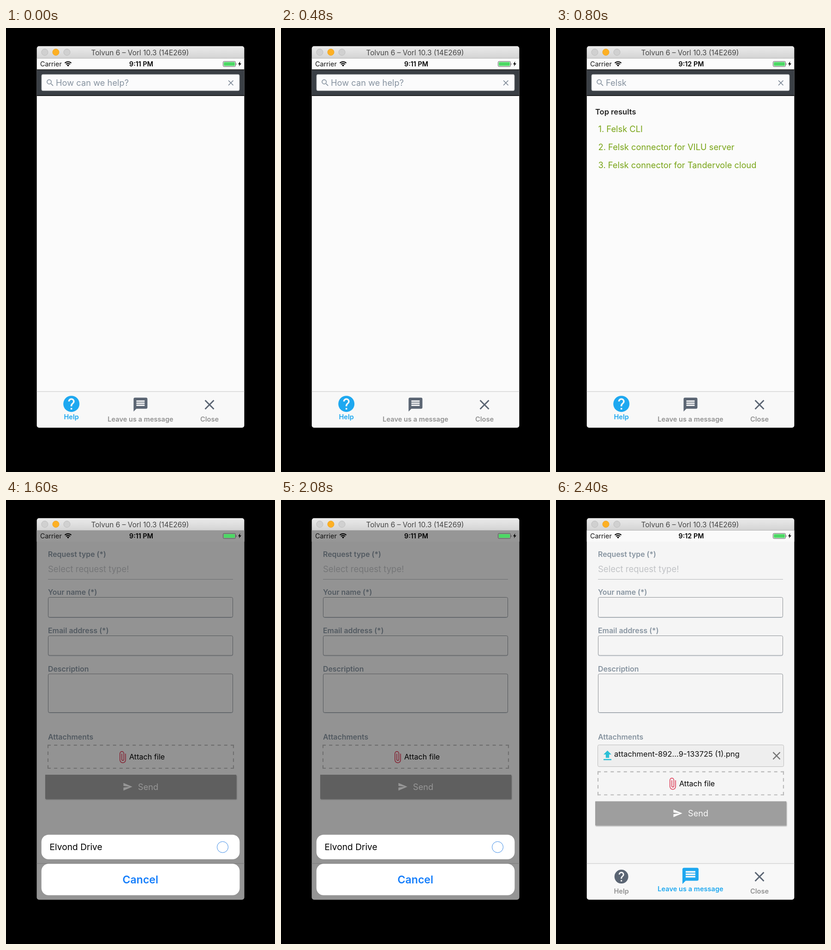
Recreate the animation shown at these times as an HTML page. Size 583 by 960 pixels, loop 3.2 s.

```html
<!DOCTYPE html>
<html lang="en">
<head>
<meta charset="utf-8">
<title>Help screens</title>
<style>
  html, body { margin: 0; width: 100%; height: 100%; overflow: hidden; background: #000; }
  svg { display: block; width: 583px; height: 960px; font-family: Inter, sans-serif; }
</style>
</head>
<body>
<svg id="stage" viewBox="0 0 583 960"></svg>
<script>
const STEP = 800;
const BLUE = '#1ea8f0', SLATE = '#5b6573', LABEL = '#8794a0';

const ICONS = {
  help: 'M12 2a10 10 0 1 0 0 20 10 10 0 0 0 0-20zm1 17h-2v-2h2zm2.07-7.75l-.9.92C13.45 12.9 13 13.5 13 15h-2v-.5c0-1.1.45-2.1 1.17-2.83l1.24-1.26c.37-.36.59-.86.59-1.41a2 2 0 0 0-4 0H8a4 4 0 0 1 8 0c0 .88-.36 1.68-.93 2.25z',
  message: 'M20 2H4a2 2 0 0 0-2 2v18l4-4h14a2 2 0 0 0 2-2V4a2 2 0 0 0-2-2zm-2 12H6v-2h12zm0-3H6V9h12zm0-3H6V6h12z',
  close: 'M19 6.4L17.6 5 12 10.6 6.4 5 5 6.4l5.6 5.6L5 17.6 6.4 19l5.6-5.6 5.6 5.6 1.4-1.4-5.6-5.6z',
  search: 'M15.5 14h-.8l-.3-.3a6.5 6.5 0 1 0-.7.7l.3.3v.8l5 5 1.5-1.5zm-6 0a4.5 4.5 0 1 1 0-9 4.5 4.5 0 0 1 0 9z',
  send: 'M2 21l21-9L2 3v7l15 2-15 2z',
  upload: 'M9 16h6v-6h4l-7-7-7 7h4zm-4 2h14v2H5z'
};

const text = (x, y, str, size, fill, weight = 400, anchor = 'start') =>
  `<text x="${x}" y="${y}" font-size="${size}" fill="${fill}" font-weight="${weight}" text-anchor="${anchor}">${str}</text>`;
const rect = (x, y, w, h, fill, more = '') =>
  `<rect x="${x}" y="${y}" width="${w}" height="${h}" fill="${fill}" ${more}/>`;
// Full-width strip; the window clip trims its ends.
const band = (y, h, fill, more) => rect(66, y, 452, h, fill, more);
const circle = (x, y, r, fill, stroke) =>
  `<circle cx="${x}" cy="${y}" r="${r}" fill="${fill}" stroke="${stroke}"/>`;
// Icons sit on a 24-unit grid centred on (x, y).
const icon = (name, x, y, scale, fill) =>
  `<path d="${ICONS[name]}" fill="${fill}" transform="translate(${x} ${y}) scale(${scale}) translate(-12 -12)"/>`;
// A straight run of equal dashes and gaps with a dash at both ends.
const dashes = (d, count) => `<path d="${d}" pathLength="${2 * count - 1}" stroke-dasharray="1"/>`;

function titleBar() {
  return band(39, 27, 'url(#chrome)') + band(65, 1, '#b4b4b4') +
    circle(84, 52.3, 7, '#d0d0d0', '#bcbcbc') +
    circle(108, 52.3, 7, '#fdb024', '#eda420') +
    circle(132, 52.3, 7, '#d0d0d0', '#bcbcbc') +
    text(290.5, 58.5, 'Tolvun 6 – Vorl 10.3 (14E269)', 15.5, '#454545', 400, 'middle');
}

function statusBar(time) {
  return text(74, 83, 'Carrier', 14.3, '#111') +
    '<g fill="none" stroke="#000" stroke-width="2"><path d="M127.5 75.8a10 10 0 0 1 14 0M130 78.6a6.4 6.4 0 0 1 9 0"/></g>' +
    '<path d="M134.5 83.2l-2.5-2.7a3.6 3.6 0 0 1 5 0z"/>' +
    text(293, 83, time, 14.4, '#000', 600, 'middle') +
    rect(470.5, 72.3, 27, 11, 'none', 'rx="2" stroke="#555"') +
    rect(472, 73.8, 24, 8, '#4cd964', 'rx="1"') +
    '<path d="M498.7 76v4q1.6-2 0-4zM507.5 72l-4.5 6.4h3l-1.2 4.6 5.2-6.6h-3.2z"/>';
}

function tab(name, label, x, active) {
  const y = name === 'close' ? 814.5 : active ? 812.7 : 814.3;
  return icon(name, x, y, active ? 1.75 : 1.5, active ? BLUE : SLATE) +
    text(x, active ? 846.3 : 851, label, 14.6, active ? BLUE : '#919191', 600, 'middle');
}

function tabBar(active) {
  return band(786, 79, '#f8f8f8') + band(785.5, 1, '#c6c6c6') +
    tab('help', 'Help', 141.7, active === 'help') +
    tab('message', 'Leave us a message', 291.5, active === 'message') +
    tab('close', 'Close', 441, false);
}

function searchPage(query, results = []) {
  const heading = results.length ? text(85, 187, 'Top results', 16.5, '#222', 600) : '';
  return band(66, 720, '#fbfbfb') +
    band(90, 57, '#3a3f45') + band(89.5, 1.5, '#111') + band(145.5, 1.5, '#111') +
    rect(77, 100.3, 429, 35.4, '#fbfbfc', 'rx="3" stroke="#a4a8ac"') +
    icon('search', 95.7, 118.5, .83, '#8793a0') +
    text(108, 125, query, 18.3, '#8793a0') +
    icon('close', 487.3, 118.7, .82, '#7d8896') + heading +
    results.map((name, i) => text(91.5, 225 + 39 * i, `${i + 1}. ${name}`, 18.3, '#78a416')).join('') +
    tabBar('help');
}

function field(label, y, height) {
  return text(91, y - 5, label, 15.9, LABEL, 600) +
    rect(91.5, y + 1.5, 400, height, 'none', 'rx="3" stroke="#c8d0d8"') +
    rect(91.5, y + .5, 400, height, '#f5f5f5', 'rx="3" stroke="#8e9297"');
}

function attachment() {
  return rect(90.5, 529.5, 403, 47, '#eee', 'rx="3" stroke="#bdbdbd"') +
    icon('upload', 111.5, 552.7, 1.22, '#2bc0d6') +
    text(126, 555, 'attachment-892...9-133725 (1).png', 16.5, '#111') +
    icon('close', 478, 553, 1.2, '#757575');
}

function formPage(attached) {
  const actions =
    '<g fill="none" stroke="#b9b9b9" stroke-width="2.2">' +
    dashes('M90 530.2H494', 29) + dashes('M90 580H494', 29) +
    dashes('M91 529V581', 4) + dashes('M493 529V581', 4) + '</g>' +
    '<path d="M259.2 549v13a6.1 6.1 0 0 1-12.2 0V548a4.2 4.2 0 0 1 8.4 0v13a2.2 2.2 0 0 1-4.4 0V549" fill="none" stroke="#df4760" stroke-width="1.7" stroke-linecap="round"/>' +
    text(267, 561, 'Attach file', 16.2, '#000') +
    rect(85, 594, 414, 52, '#9e9e9e', 'filter="url(#shadow)"') +
    icon('send', 263.7, 620, .92, '#fafafa') +
    text(286, 626.5, 'Send', 18.2, '#fafafa');
  return band(66, 720, '#f5f5f5') + band(66, 24, '#fafafa') +
    text(91, 122.5, 'Request type (*)', 15.9, LABEL, 600) +
    text(91, 156, 'Select request type!', 18.5, '#c1c3c6') +
    rect(91, 171, 401, 1, '#b5b7ba') +
    field('Your name (*)', 210, 43) + field('Email address (*)', 293, 42.5) + field('Description', 375.5, 83.5) +
    text(91, 517.5, 'Attachments', 15.9, LABEL, 600) +
    (attached ? attachment() : '') +
    `<g transform="translate(0 ${attached ? 57.5 : 0})">${actions}</g>` +
    tabBar('message');
}

function actionSheet() {
  return band(66, 799, '#000', 'opacity=".4"') +
    rect(76.8, 723.8, 429.6, 53, '#fff', 'rx="15.5"') +
    rect(76.8, 786.6, 429.6, 68, '#fff', 'rx="15.5"') +
    text(94.5, 757, 'Elvond Drive', 19.2, '#000') +
    circle(469.5, 750.5, 12, 'none', '#3b8ae6') +
    text(291.3, 829, 'Cancel', 23.1, '#157efb', 600, 'middle');
}

const scenes = [
  searchPage('How can we help?') + statusBar('9:11 PM'),
  searchPage('Felsk', ['Felsk CLI', 'Felsk connector for VILU server', 'Felsk connector for Tandervole cloud']) + statusBar('9:12 PM'),
  formPage(false) + actionSheet() + statusBar('9:11 PM'),
  formPage(true) + statusBar('9:12 PM')
];

const stage = document.getElementById('stage');
stage.innerHTML = `<defs>
  <linearGradient id="chrome" x2="0" y2="1"><stop stop-color="#ebebeb"/><stop offset="1" stop-color="#d3d3d3"/></linearGradient>
  <clipPath id="window"><rect x="66.7" y="39.2" width="449.7" height="825" rx="5"/></clipPath>
  <filter id="shadow"><feDropShadow dx="1" dy="1.5" stdDeviation="1" flood-opacity=".4"/></filter>
  </defs><g clip-path="url(#window)">${scenes.map(scene => `<g class="scene">${scene}</g>`).join('')}${titleBar()}</g>`;
const layers = stage.querySelectorAll('.scene');

const start = performance.now();
function draw(now) {
  const current = Math.floor(Math.max(0, now - start) / STEP) % scenes.length;
  layers.forEach((layer, i) => layer.style.display = i === current ? '' : 'none');
  requestAnimationFrame(draw);
}
draw(start);
</script>
</body>
</html>
```
